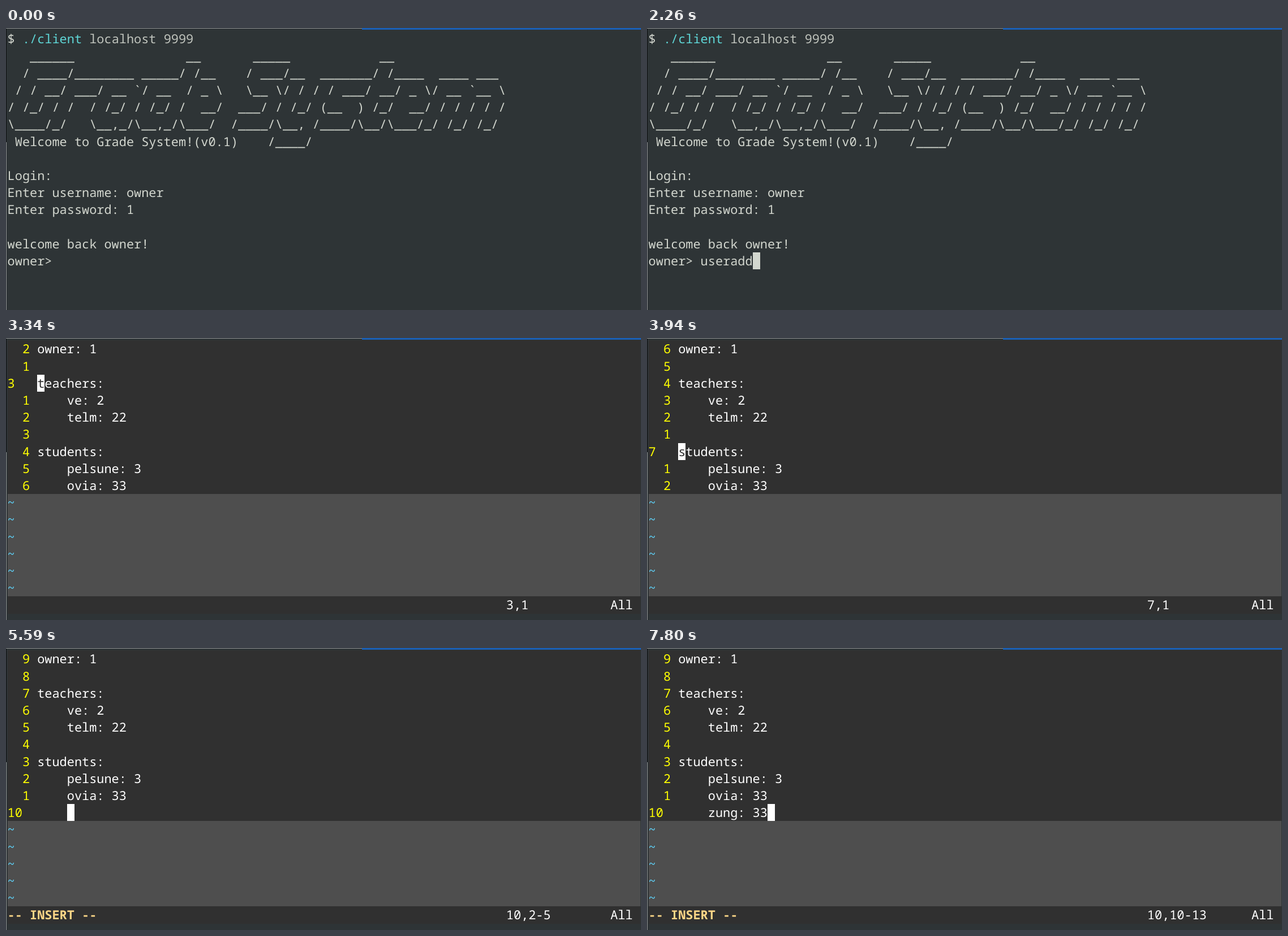
These frames come from a looping animation (1122x499 px, 8 s). An HTML page:

```html
<!DOCTYPE html>
<html lang="en">
<head>
<meta charset="utf-8">
<title>Grade System terminal</title>
<style>
  html, body { margin: 0; width: 100%; height: 100%; overflow: hidden; background: #2e3436; }
  body { position: relative; }
  /* 85 x 16 character grid; text sits 1px lower than its cell */
  .screen {
    --w: 13.152px; --h: 30.2px;
    position: absolute; left: 2.6px; top: 4.4px;
    width: calc(85 * var(--w)); height: calc(16 * var(--h)); margin: 0;
    font: 21.92px/30.2px "Noto Sans Mono", monospace;
    text-rendering: geometricPrecision; font-variant-ligatures: none;
    white-space: pre; color: #d3d7cf;
  }
  .screen div, .screen span { position: absolute; left: calc(var(--c, 0) * var(--w)); top: calc(var(--r, 0) * var(--h)); }
  .screen .inline { position: static; }
  .cursor { width: var(--w); height: var(--h); background: #d3d7cf; }
  #shell { padding-top: 1px; }
  #editor { background: #303030; color: #fff; }
  #editor span { margin-top: 1px; }
  #editor .cursor { margin-top: 0; line-height: calc(var(--h) + 2px); background: #fff; color: #303030; }
  #editor .empty { width: 100%; bottom: var(--h); padding-top: 1px; background: #4e4e4e; color: #5fd7ff; }
  .number { color: #ff0; }
  .mode { color: #ffd787; font-weight: bold; }
  .edge { position: absolute; left: 0; top: 0; }
</style>
</head>
<body>
<div class="edge" style="width:629px;height:1px;background:#8f9293"></div>
<div class="edge" style="left:629px;width:493px;height:3px;background:#1a5fb4"></div>
<div class="edge" style="top:1px;width:1px;height:201px;background:#0c0e0f"></div>
<div class="edge" style="top:202px;width:1px;height:297px;background:#8f9293"></div>

<pre class="screen" id="shell">$ <span class="inline" style="color:#5fd7d7">./client</span> <span class="inline" style="color:#c0c4bd">localhost 9999</span>
   ______               __       _____            __
  / ____/________ _____/ /__    / ___/__  _______/ /____  ____ ___
 / / __/ ___/ __ `/ __  / _ \   \__ \/ / / / ___/ __/ _ \/ __ `__ \
/ /_/ / /  / /_/ / /_/ /  __/  ___/ / /_/ (__  ) /_/  __/ / / / / /
\____/_/   \__,_/\__,_/\___/  /____/\__, /____/\__/\___/_/ /_/ /_/
 Welcome to Grade System!(v0.1)    /____/

Login:
Enter username: owner
Enter password: 1

welcome back owner!
owner&gt; <span class="inline" id="command"></span><span class="cursor" id="prompt"></span></pre>
<div class="screen" id="editor"></div>

<script>
const LOOP = 8000, EDITOR_START = 2540, INSERT_START = 4930;
const COMMAND = "useradd", commandTimes = [1460, 1520, 1660, 1790, 1990, 2190, 2260];
const downTimes = [3200, 3340, 3530, 3660, 3800, 3940, 4130, 4270];
const ENTRY = "\tzung: 33", entryTimes = [5590, 6140, 6280, 6410, 6540, 7140, 7340, 7740, 7800];
const FILE = ["owner: 1", "", "teachers:", "\tve: 2", "\ttelm: 22", "", "students:", "\tpelsune: 3", "\tovia: 33"];
const GUTTER = 4, STATUS_ROW = 15;

const $ = id => document.getElementById(id);
const passed = (times, t) => times.filter(time => t >= time).length;
const within = (t, from, to) => t >= from && t < to;
const show = (element, visible) => element.style.display = visible ? "block" : "none";
const expand = text => text.replace("\t", "    ");
const cell = (row, col, text, cls = "") =>
  `<span class="${cls}" style="--r:${row};--c:${col}">${text}</span>`;

function drawShell(t) {
  const count = passed(commandTimes, t);
  $("command").textContent = COMMAND.slice(0, count);
  $("prompt").style.cssText = `--r:13;--c:${7 + count}`;
  show($("prompt"), within(t, 70, 650) || t >= 1250);
}

function editorHtml(t) {
  const inserting = t >= INSERT_START;
  const typed = ENTRY.slice(0, passed(entryTimes, t));
  const lines = inserting ? [...FILE, typed] : FILE;
  const current = inserting ? FILE.length : passed(downTimes, t);
  const line = lines[current], shown = expand(line);

  // In normal mode the cursor rests on the last cell of a leading tab.
  const column = inserting ? shown.length : line[0] === "\t" ? 3 : 0;
  const byte = inserting ? line.length + 1 : line ? 1 : 0;
  const position = byte === column + 1 ? byte : `${byte}-${column + 1}`;

  let html = `<div class="empty" style="--r:${lines.length}">${"~\n".repeat(STATUS_ROW - lines.length)}</div>`;
  lines.forEach((text, row) => {
    const number = row === current ? row + 1 : String(Math.abs(row - current)).padStart(3);
    html += cell(row, 0, number, "number") + cell(row, GUTTER, expand(text));
  });
  if (!within(t, 3070, 3140) && !within(t, 5460, 5520))
    html += cell(current, GUTTER + column, shown[column] || "", "cursor");
  if (inserting) html += cell(STATUS_ROW, 0, "-- INSERT --", "mode");
  return html + cell(STATUS_ROW, 67, `${current + 1},${position}`)
    + cell(STATUS_ROW, 81, inserting && !typed ? "Top" : "All");
}

let lastHtml = "";
function draw(now) {
  const t = now % LOOP, editing = t >= EDITOR_START;
  show($("shell"), !editing);
  show($("editor"), editing);
  if (!editing) return drawShell(t);
  const html = editorHtml(t);
  if (html !== lastHtml) $("editor").innerHTML = lastHtml = html;
}

const start = performance.now();
function tick() {
  draw(performance.now() - start);
  requestAnimationFrame(tick);
}
tick();
</script>
</body>
</html>
```
